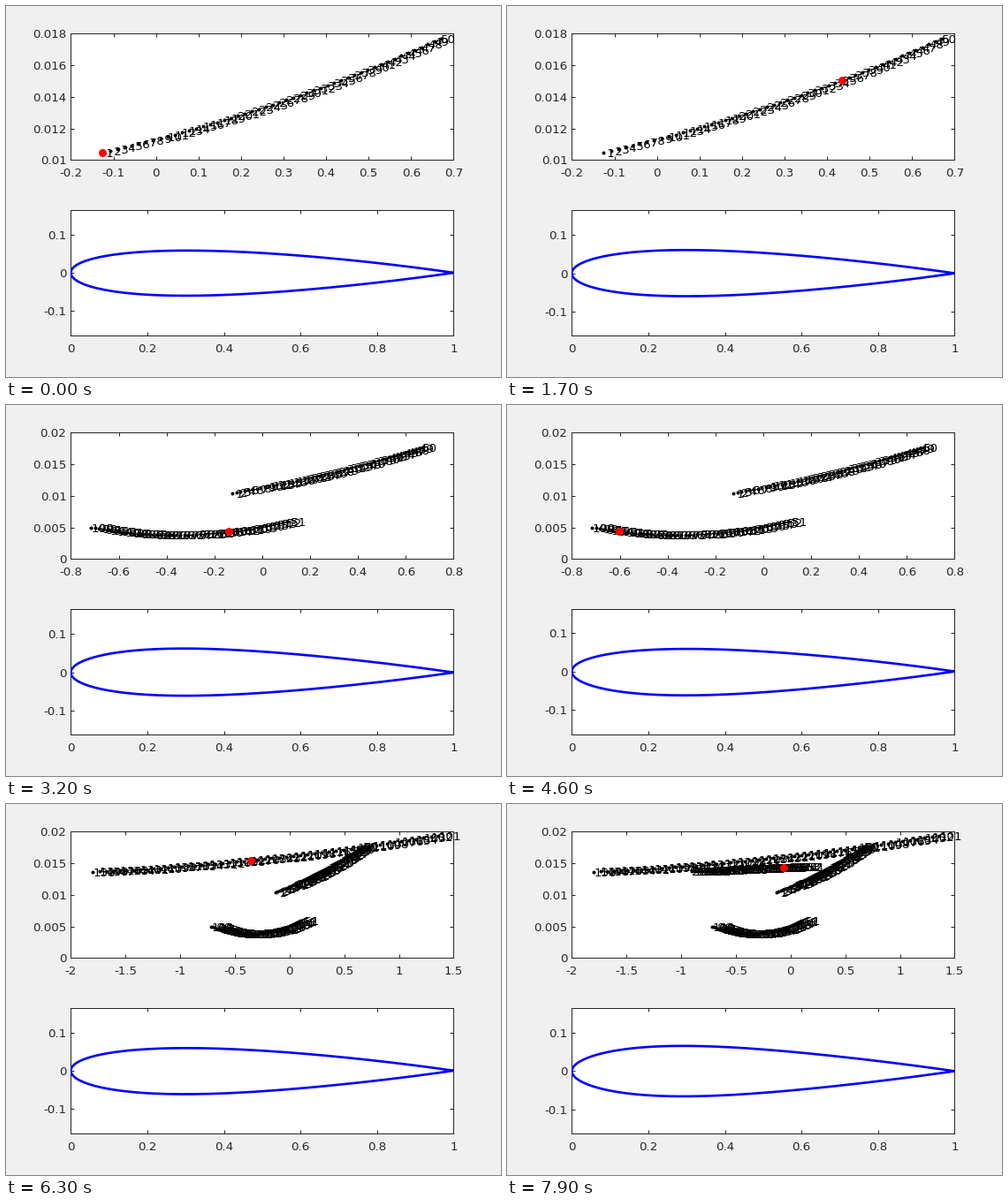
A matplotlib script that plays this animation: 560 by 420 pixels, repeating every 8 s.

```python
import numpy as np
import matplotlib.pyplot as plt
from matplotlib.animation import FuncAnimation

W, H = 560, 420
FRAMES, INTERVAL = 80, 100
BATCH = 50  # points per sweep, two per frame
PX = 0.72  # points per pixel at 100 dpi
INK = (0.15, 0.15, 0.15)

plt.rcParams["font.family"] = "DejaVu Sans"
plt.rcParams["font.size"] = 13.33 * PX

# x range, y range, y bow, upper and lower bump at both ends
SWEEPS = [
    ((-0.125, 0.67), (0.01046, 0.0177), -0.0005, (-0.002, 0.002), (0, 0)),
    ((0.102, -0.715), (0.0059, 0.005), -0.0016, (0.0045, -0.002), (0, 0.003)),
    ((1.36, -1.8), (0.0194, 0.01365), -0.0009, (0.0065, -0.0075), (-0.007, 0.009)),
    ((0.11, -0.9), (0.0145, 0.0137), 0, (0.009, -0.009), (0.009, -0.009)),
]


def lerp(ends, t):
    return ends[0] + (ends[1] - ends[0]) * t


def sweep_points(xr, yr, bow):
    t = np.linspace(0, 1, BATCH)
    arc = t * (1 - t)
    return lerp(xr, t + 0.05 * arc), lerp(yr, t) + 4 * bow * arc


def nice_ticks(values, most):
    """Round ticks around the data with the finest step that fits."""
    for step in (m * 10.0**e for e in range(-4, 1) for m in (1, 2, 5)):
        lo, hi = np.floor(values.min() / step), np.ceil(values.max() / step)
        if hi - lo <= most:
            return np.arange(lo, hi + 1) * step


def tick_text(v, _):
    return f"{round(v, 6) + 0.0:g}"


def make_axes(fig, left, top, right, bottom):
    ax = fig.add_axes([left / W, 1 - bottom / H, (right - left) / W, (bottom - top) / H])
    for spine in ax.spines.values():
        spine.set(color=INK, linewidth=PX, zorder=1.5)
    ax.set_axisbelow(True)
    ax.tick_params(direction="in", top=True, right=True, length=4.3 * PX,
                   width=PX, color=INK, labelcolor=INK)
    ax.tick_params(axis="x", pad=8.4 * PX)
    ax.tick_params(axis="y", pad=5 * PX)
    ax.xaxis.set_major_formatter(tick_text)
    ax.yaxis.set_major_formatter(tick_text)
    return ax


# Symmetric 12 % section with a forward bump on each side
chord = (1 - np.cos(np.linspace(0, np.pi, 120))) / 2
base = 0.6 * (0.2969 * np.sqrt(chord) - 0.126 * chord - 0.3516 * chord**2
              + 0.2843 * chord**3 - 0.1036 * chord**4)
bump = np.sin(np.pi * np.sqrt(chord)) ** 2

fig = plt.figure(figsize=(W / 100, H / 100), dpi=100, facecolor=(0.94, 0.94, 0.94))
top = make_axes(fig, 73.4, 31.4, 506.4, 174.4)
low = make_axes(fig, 73.4, 231.4, 506.4, 373.4)
low.set_xlim(0, 1)
low.set_xticks(np.linspace(0, 1, 6))
low.set_yticks([-0.1, 0, 0.1])
span = 142 / 433  # equal scale on both axes

paths = [sweep_points(*s[:3]) for s in SWEEPS]
groups, views = [], []
for b, (xs, ys) in enumerate(paths):
    dots, = top.plot(xs, ys, "o", color="k", ms=4 * PX, mew=0)
    pad = len(str((b + 1) * BATCH))
    labels = [top.text(x, y, str(n).rjust(pad), color="k",
                       va="center_baseline", zorder=3)
              for n, (x, y) in enumerate(zip(xs, ys), b * BATCH + 1)]
    groups.append([dots, *labels])
    seen_x, seen_y = np.hstack(paths[:b + 1])
    views.append((nice_ticks(seen_x, 10), nice_ticks(seen_y, 5)))

marker, = top.plot([], [], "o", color="r", ms=9 * PX, mew=0, zorder=5)
foil, = low.plot([], [], color="b", lw=2.67 * PX, zorder=3)


def update(frame):
    b, i = divmod(2 * frame, BATCH)
    for g, group in enumerate(groups):
        for artist in group:
            artist.set_visible(g <= b)

    xt, yt = views[b]
    top.set_xticks(xt)
    top.set_yticks(yt)
    top.set_xlim(xt[0], xt[-1])
    top.set_ylim(yt[0], yt[-1])
    xs, ys = paths[b]
    marker.set_data([xs[i]], [ys[i]])

    t = i / (BATCH - 1)
    upper, lower = (base + lerp(ends, t) * bump for ends in SWEEPS[b][3:])
    foil.set_data(np.r_[chord[::-1], chord], np.r_[upper[::-1], -lower])
    mid = (upper.max() - lower.max()) / 2
    low.set_ylim(mid - span / 2, mid + span / 2)
    return marker, foil


anim = FuncAnimation(fig, update, frames=FRAMES, interval=INTERVAL,
                     repeat=True, repeat_delay=0, blit=False)
plt.show()
```
